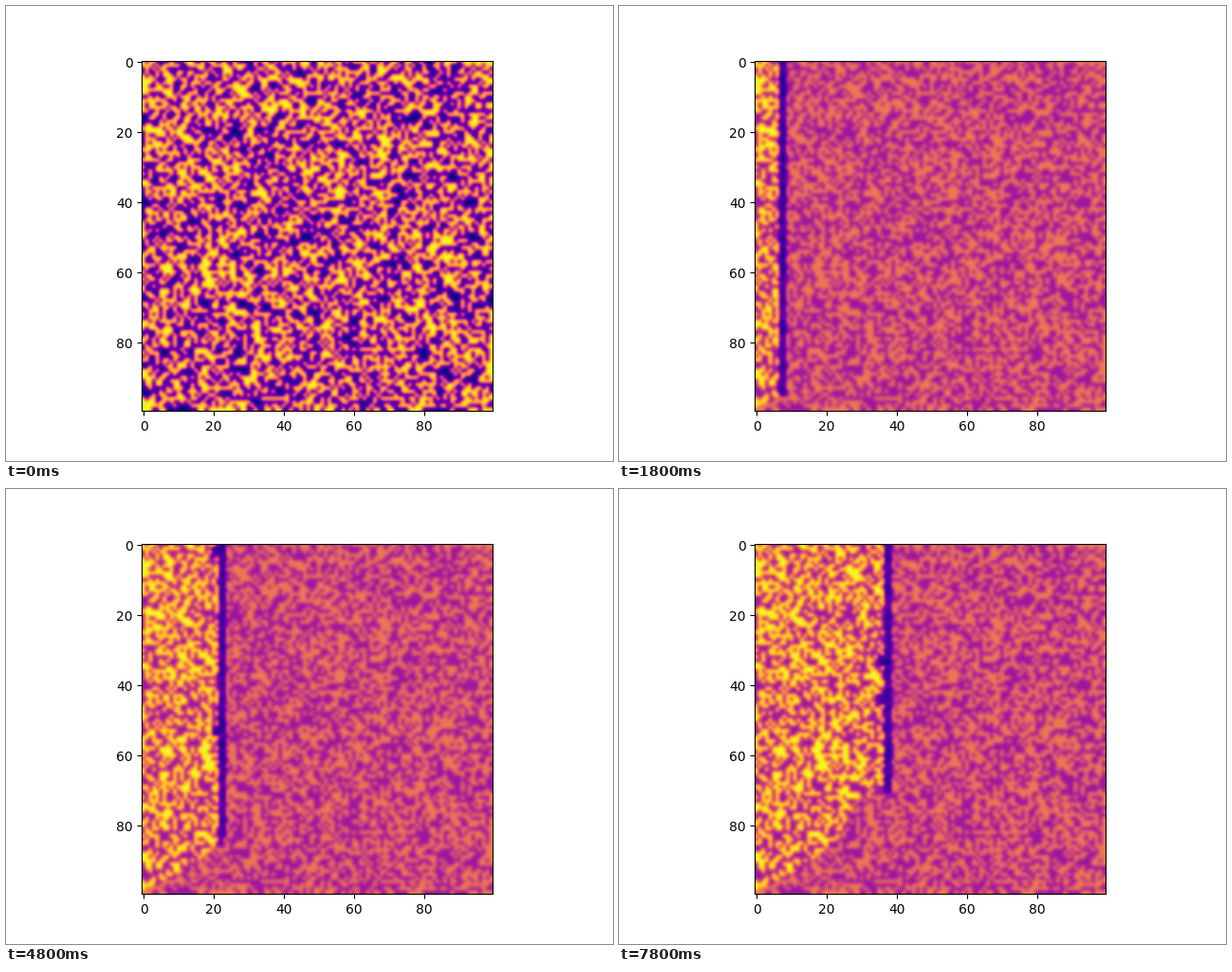
A matplotlib script that plays this animation: 640 px wide and 480 px high, repeating every 8 s.

```python
import matplotlib.pyplot as plt
import numpy as np
from matplotlib.animation import FuncAnimation

SIZE = 100
FRAMES = 40
INTERVAL = 200
BURN_STEPS = 2
BURNING, EMBER, BURNT = -1, -0.6, 2

rows, cols = np.mgrid[:SIZE, :SIZE]
forest = np.random.default_rng(12).integers(0, 2, (SIZE, SIZE)).astype(float)


def fire_times():
    """Step at which each cell catches fire and step at which it is out."""
    # the front moves one column per step while its lower end recedes
    lower_end = np.interp(cols, [0, 8, 22, 29, 38], [98, 95, 85, 72, 70])
    start = np.where(rows <= lower_end, cols + 1, np.inf)
    end = start + BURN_STEPS
    # pockets that keep burning a little longer
    for r, c in [(33, 36), (44, 35), (2, 21), (53, 21), (1, 15), (80, 15)]:
        end[np.hypot(rows - r, cols - c) < 2] += BURN_STEPS
    return start, end


start, end = fire_times()


def state(step):
    grid = forest.copy()
    fire = (start <= step) & (step < end)
    grid[fire] = np.where(forest[fire] == 1, BURNING, EMBER)
    grid[(step >= end) & (forest == 1)] = BURNT
    return grid


fig, ax = plt.subplots(figsize=(6.4, 4.8), dpi=100)
image = ax.imshow(forest, cmap="plasma", interpolation="bicubic")


def update(step):
    grid = state(step)
    image.set_data(grid)
    image.set_clim(grid.min(), grid.max())
    return [image]


anim = FuncAnimation(fig, update, frames=FRAMES, interval=INTERVAL,
                     repeat=True, repeat_delay=0)
plt.show()
```
